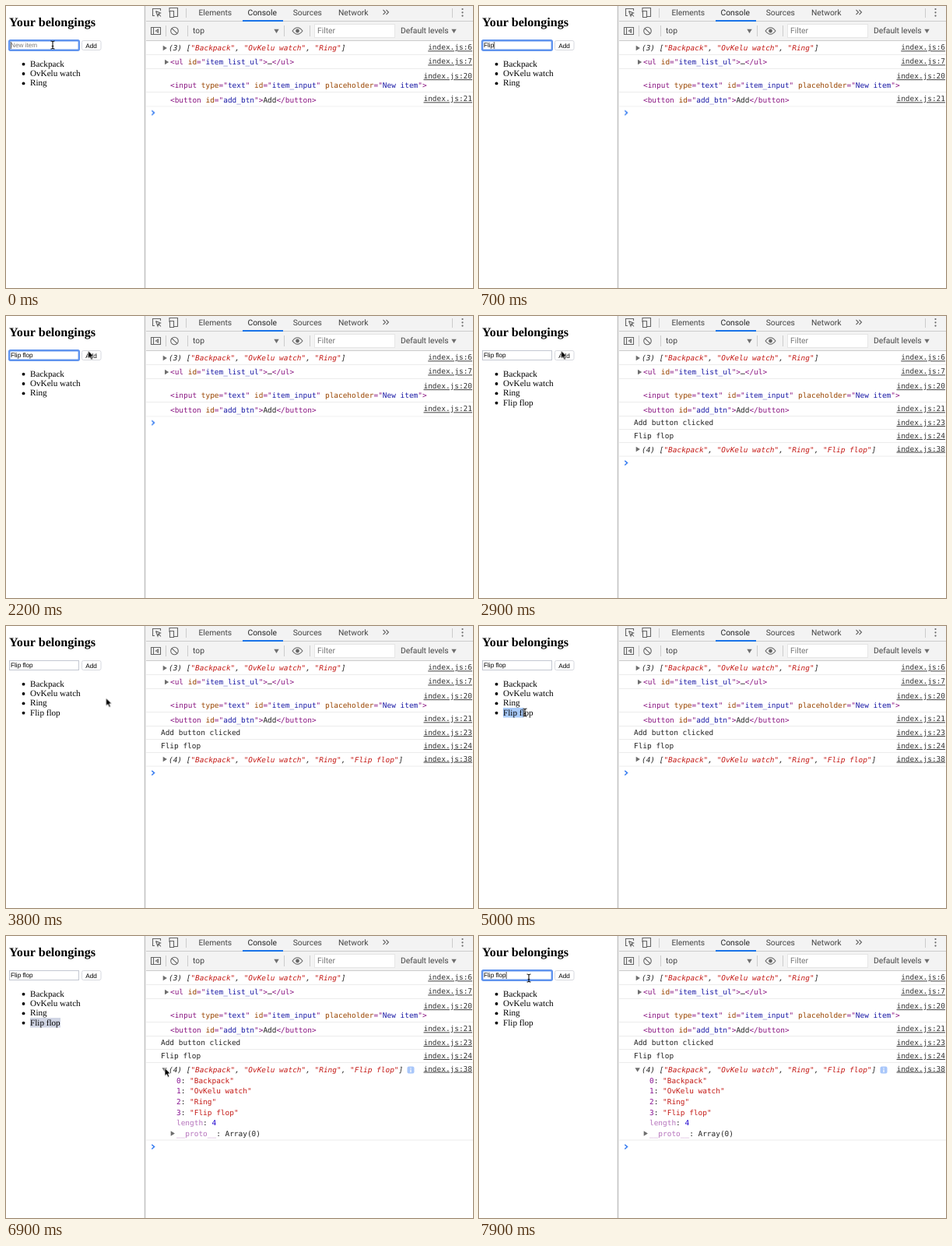
Write an HTML page that moves like this. It is 600 px wide and 362 px high and loops after 8 s.

```html
<!DOCTYPE html>
<html lang="en">
<head>
<meta charset="utf-8">
<title>Your belongings</title>
<style>
html, body { margin: 0; width: 100%; height: 100%; overflow: hidden; background: #fff; }
svg { display: block; width: 600px; height: 362px; }
text { text-rendering: geometricPrecision; }

.page { font: 11.15px "Liberation Serif", serif; }
.page .title { font-size: 16.1px; font-weight: bold; }
.form { font: 8.2px "Liberation Sans", sans-serif; }
.ui { font: 10.3px Roboto, sans-serif; fill: #444; }
.log { font: 9.45px "DejaVu Sans Mono", monospace; fill: #222; }
.log .i { font-style: italic; }
.link { text-anchor: end; text-decoration: underline; fill: #333; }
.tag { fill: #881280; }
.attr { fill: #994500; }
.val { fill: #1a1aa6; }
.str { fill: #c41a16; }
.key { fill: #881391; }
.dim { fill: #b673bc; }
.num { fill: #1c00cf; }
.rule { stroke: #ececec; }
.bar { stroke: #ccc; }
.icon { fill: none; stroke: #666; stroke-width: 1.1; }
.tri { fill: #6e6e6e; }

/* 1% = 80ms */
.focus, .blur, .holder, .caret, .added, .open, .closed, .beam, .arrow, .typed, .prompt, .sel {
  animation: 8s step-end infinite;
}
.focus { animation-name: focus; }
.blur { animation-name: blur; }
.holder { animation-name: holder; }
.caret { animation-name: caret; }
.added { animation-name: added; }
.open { animation-name: open; }
.closed { animation-name: closed; }
.beam { animation-name: beam; }
.arrow { animation-name: arrow; }
.typed { animation-name: typed; }
.prompt { animation-name: prompt; }
.sel { animation-name: select, tint; transform-origin: 31px 0; }
.mouse { animation: mouse 8s step-end infinite; }

@keyframes focus {
  0%, 96.25% { visibility: visible; }
  36.25% { visibility: hidden; }
}
@keyframes blur {
  0%, 96.25% { visibility: hidden; }
  36.25% { visibility: visible; }
}
@keyframes holder {
  0% { visibility: visible; }
  3.75%, 100% { visibility: hidden; }
}
@keyframes caret {
  0%, 30%, 96.25% { visibility: visible; }
  23.75%, 36.25% { visibility: hidden; }
}
@keyframes added {
  0% { visibility: hidden; }
  36.25%, 100% { visibility: visible; }
}
@keyframes open {
  0% { visibility: hidden; }
  81.25%, 100% { visibility: visible; }
}
@keyframes closed {
  0%, 81.25%, 100% { visibility: hidden; }
  36.25% { visibility: visible; }
}
@keyframes beam {
  0%, 21.25%, 55%, 93.75% { visibility: visible; }
  3.75%, 25%, 70% { visibility: hidden; }
}
@keyframes arrow {
  0%, 55%, 93.75%, 100% { visibility: hidden; }
  25%, 70% { visibility: visible; }
}
@keyframes typed {
  0% { transform: none; }
  3.75% { transform: translateX(5px); }
  5% { transform: translateX(6.8px); }
  6.25% { transform: translateX(8.7px); }
  7.5% { transform: translateX(13.2px); }
  11.25% { transform: translateX(15.5px); }
  12.5% { transform: translateX(17.8px); }
  13.75% { transform: translateX(19.6px); }
  15% { transform: translateX(24.1px); }
  16.25%, 100% { transform: translateX(28.8px); }
}
@keyframes prompt {
  0% { transform: translateY(128.5px); }
  36.25% { transform: translateY(180px); }
  81.25%, 100% { transform: translateY(262px); }
}
@keyframes select {
  0%, 96.25%, 100% { transform: scaleX(0); }
  58.75% { transform: scaleX(0); animation-timing-function: steps(2); }
  61.25% { transform: scaleX(.67); }
  63.75% { transform: scaleX(.67); animation-timing-function: steps(2); }
  66.25% { transform: scaleX(1); }
}
@keyframes tint {
  0% { fill: #a9cbfa; }
  81.25%, 100% { fill: #d0d5e4; }
}
@keyframes mouse {
  0% { transform: translate(60px, 50px); }
  22.5% { transform: translate(60px, 50px); animation-timing-function: steps(3); }
  26.25% { transform: translate(105.5px, 44.5px); }
  37.5% { transform: translate(105.5px, 44.5px); animation-timing-function: steps(5); }
  43.75% { transform: translate(128.5px, 92.5px); }
  50% { transform: translate(128.5px, 92.5px); animation-timing-function: steps(5); }
  56.25% { transform: translate(31px, 111px); }
  58.75% { transform: translate(31px, 111px); animation-timing-function: steps(2); }
  61.25% { transform: translate(59px, 111px); }
  63.75% { transform: translate(59px, 111px); animation-timing-function: steps(2); }
  66.25% { transform: translate(70px, 111px); }
  70% { transform: translate(70px, 111px); animation-timing-function: steps(6); }
  77.5% { transform: translate(204px, 169.5px); }
  87.5% { transform: translate(204px, 169.5px); animation-timing-function: steps(2); }
  90% { transform: translate(165px, 138px); animation-timing-function: steps(2); }
  92.5% { transform: translate(115px, 88px); animation-timing-function: steps(2); }
  95%, 100% { transform: translate(64px, 54px); }
}
</style>
</head>
<body>
<svg viewBox="0 0 600 362">
  <defs>
    <path id="right" class="tri" d="M-2.3-3.2L2.9 0L-2.3 3.2Z"/>
    <path id="down" class="tri" d="M-3.2-2.3H3.2L0 2.9Z"/>
  </defs>

  <!-- Web page -->
  <rect class="sel" x="31" y="105" width="39" height="12.5"/>
  <g class="page">
    <text class="title" x="4" y="26">Your belongings</text>
    <circle cx="22.5" cy="74.7" r="1.9"/><text x="31" y="77.8">Backpack</text>
    <circle cx="22.5" cy="87" r="1.9"/><text x="31" y="90.1">OvKelu watch</text>
    <circle cx="22.5" cy="99.4" r="1.9"/><text x="31" y="102.4">Ring</text>
    <g class="added"><circle cx="22.5" cy="111.7" r="1.9"/><text x="31" y="114.8">Flip flop</text></g>
  </g>
  <g class="form">
    <rect class="blur" x="4.5" y="44.5" width="89" height="12" fill="#fff" stroke="#c4c8d2"/>
    <rect class="focus" x="4.2" y="44.2" width="89.6" height="12.6" rx="1.5" fill="#fff" stroke="#5f93ee" stroke-width="2.4"/>
    <text x="6" y="53.4">Flip flop</text>
    <g class="typed">
      <rect x="6" y="46" width="31" height="9" fill="#fff"/>
      <path class="caret" d="M6.3 46V55" stroke="#222" stroke-width=".8"/>
    </g>
    <text class="holder" x="6" y="53.4" fill="#777">New item</text>
    <rect x="97.5" y="44.5" width="24.5" height="12" rx="2" fill="#fff" stroke="#d6d8de"/>
    <text x="102.3" y="53.5">Add</text>
  </g>

  <!-- Developer tools -->
  <path d="M180 0H600V44.5H180Z" fill="#f3f3f3"/>
  <path class="bar" d="M180 19.5H600M180 44.5H600M231.5 3V15M573.5 3V15M205.5 25V39M233.5 25V39M357.5 25V39M390.5 25V39"/>
  <path d="M178.5 0V362" stroke="#c3c3c3" stroke-width="1.6"/>
  <path d="M304 18H356V20H304Z" fill="#1a73e8"/>
  <g class="icon">
    <path d="M191 12.5H188.5V3.5H198.5V6M192.5 6.5L198.5 9L196 10L199 13.5M192.5 6.5L195 13L196 10"/>
    <path d="M210 8V2.5H220.5V13.5H216M210.5 6.5H215.5V14.5H210.5Z"/>
    <path d="M186.5 27.5H198.5V36.5H186.5ZM189.5 27.5V36.5M195.5 30L192.5 32L195.5 34Z"/>
    <circle cx="216.5" cy="32" r="4.8"/>
    <path d="M213 28.6L220 35.4"/>
    <path d="M368 32Q374.500 23.500 381 32Q374.500 40.500 368 32Z"/>
    <path d="M484.500 5L487.500 8L484.500 11M488.500 5L491.500 8L488.500 11"/>
  </g>
  <circle cx="374.5" cy="32" r="2.4" fill="#666"/>
  <g fill="#666"><circle cx="586.5" cy="4" r="1.1"/><circle cx="586.5" cy="8.300" r="1.1"/><circle cx="586.5" cy="12.600" r="1.1"/></g>
  <rect x="396.500" y="23.500" width="103" height="17" fill="#fff" stroke="#e6e6e6"/>
  <g class="ui">
    <text x="247.500" y="11.800">Elements</text>
    <text x="310.500" y="11.800" fill="#222">Console</text>
    <text x="368.700" y="11.800">Sources</text>
    <text x="427" y="11.800">Network</text>
    <text x="240" y="35.300">top</text>
    <text x="400" y="35.300" fill="#777">Filter</text>
    <text x="507" y="35.300" textLength="">Default levels</text>
  </g>
  <use href="#down" x="347.500" y="32"/>
  <use href="#down" x="575.500" y="32"/>

  <path class="rule" d="M180 62.500H600M180 80.500H600M180 110.500H600"/>
  <use href="#right" x="204" y="54"/>
  <use href="#right" x="206.300" y="72"/>
  <g class="log">
    <text class="i" x="209" y="57.400">(3) [<tspan class="str">"Backpack"</tspan>, <tspan class="str">"OvKelu watch"</tspan>, <tspan class="str">"Ring"</tspan>]</text>
    <text class="tag" x="211" y="75.400">&lt;ul <tspan class="attr">id</tspan>="<tspan class="val">item_list_ul</tspan>"&gt;<tspan fill="#222">…</tspan>&lt;/ul&gt;</text>
    <text class="tag" x="211" y="105.400">&lt;input <tspan class="attr">type</tspan>="<tspan class="val">text</tspan>" <tspan class="attr">id</tspan>="<tspan class="val">item_input</tspan>" <tspan class="attr">placeholder</tspan>="<tspan class="val">New item</tspan>"&gt;</text>
    <text class="tag" x="211" y="123.800">&lt;button <tspan class="attr">id</tspan>="<tspan class="val">add_btn</tspan>"&gt;<tspan fill="#222">Add</tspan>&lt;/button&gt;</text>
    <text class="link" x="599" y="56.400">index.js:6</text>
    <text class="link" x="599" y="74.400">index.js:7</text>
    <text class="link" x="599" y="93.200">index.js:20</text>
    <text class="link" x="599" y="122.400">index.js:21</text>

    <g class="added">
      <path class="rule" d="M180 128.500H600M180 145.500H600M180 162.500H600"/>
      <text x="199" y="140.400">Add button clicked</text>
      <text x="199" y="157.400">Flip flop</text>
      <text class="i" x="209" y="174.700">(4) [<tspan class="str">"Backpack"</tspan>, <tspan class="str">"OvKelu watch"</tspan>, <tspan class="str">"Ring"</tspan>, <tspan class="str">"Flip flop"</tspan>]</text>
      <text class="link" x="599" y="140">index.js:23</text>
      <text class="link" x="599" y="157">index.js:24</text>
      <text class="link" x="599" y="173.600">index.js:38</text>
    </g>
    <use class="closed" href="#right" x="204" y="171"/>

    <g class="open">
      <use href="#down" x="203.700" y="171.500"/>
      <rect x="515.500" y="167.500" width="9" height="9" rx="2" fill="#a9c7fa"/>
      <path d="M520 169.200V170.500M520 171.500V175" stroke="#fff" stroke-width="1.300"/>
      <text class="str" x="219" y="188.500"><tspan class="key">0</tspan><tspan fill="#222">: </tspan>"Backpack"</text>
      <text class="str" x="219" y="202.200"><tspan class="key">1</tspan><tspan fill="#222">: </tspan>"OvKelu watch"</text>
      <text class="str" x="219" y="215.900"><tspan class="key">2</tspan><tspan fill="#222">: </tspan>"Ring"</text>
      <text class="str" x="219" y="229.600"><tspan class="key">3</tspan><tspan fill="#222">: </tspan>"Flip flop"</text>
      <text x="219" y="243.300"><tspan class="dim">length</tspan>: <tspan class="num">4</tspan></text>
      <text x="219" y="257"><tspan class="dim">__proto__</tspan>: Array(0)</text>
      <use href="#right" x="214" y="253.500"/>
    </g>
  </g>
  <g class="prompt">
    <path class="rule" d="M180 0H600"/>
    <path d="M187.300 5.700L190.500 8.600L187.300 11.500" fill="none" stroke="#367cf1" stroke-width="1.500"/>
  </g>

  <g class="mouse">
    <path class="beam" d="M-2.500-5Q0-5 0-3.500Q0-5 2.500-5M0-4V4M-2.500 5Q0 5 0 3.500Q0 5 2.500 5M-1.300 1.500H1.300" fill="none" stroke="#111" stroke-width="1.100"/>
    <path class="arrow" d="M0 0V10.200L2.400 8L4 11.700L5.900 10.900L4.300 7.300H7.500Z" stroke="#fff" stroke-width=".8"/>
  </g>
</svg>
</body>
</html>
```
